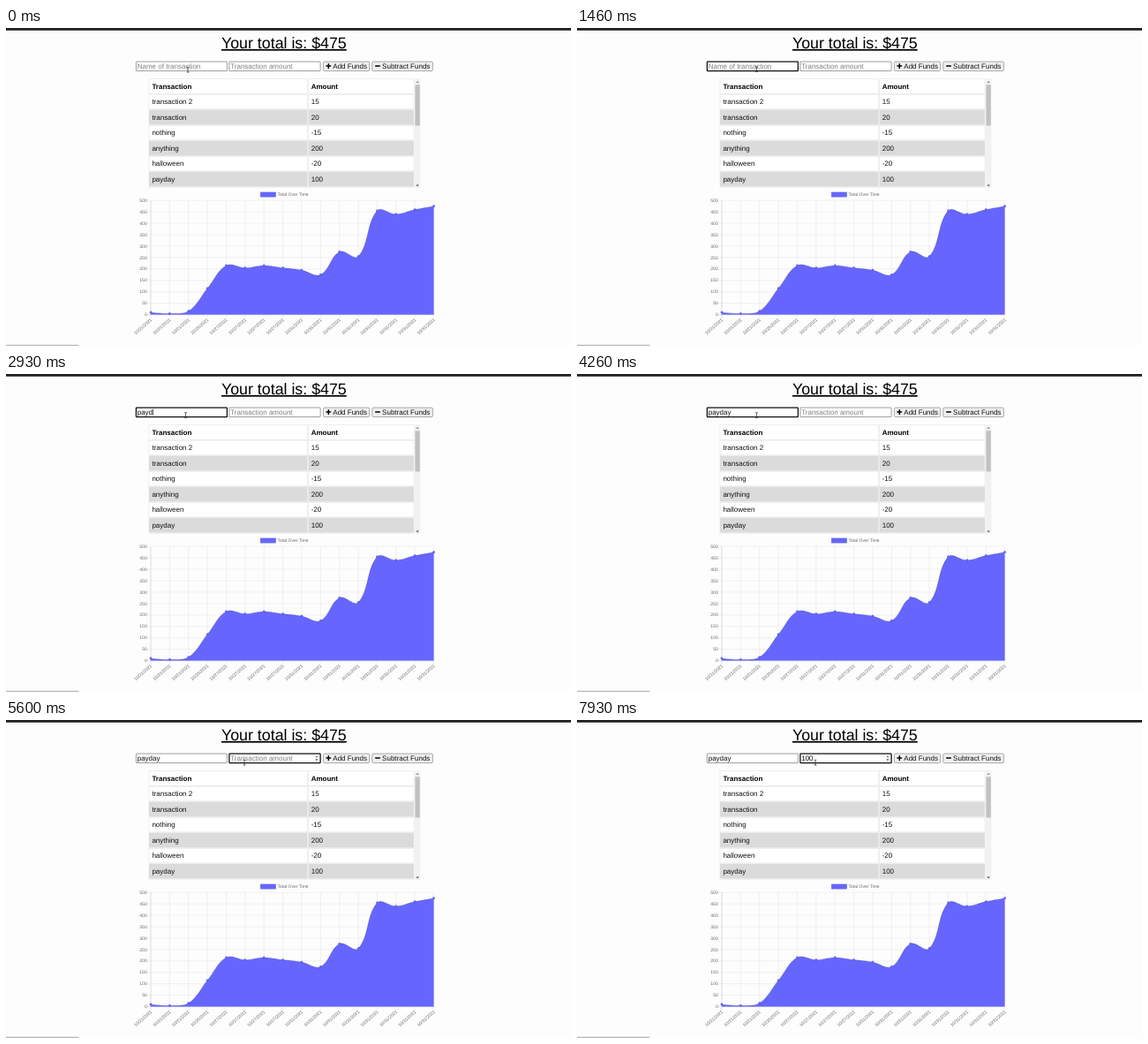
Animation of 640x360 px, one loop 8000 ms. Source, as an HTML page:

```html
<!DOCTYPE html>
<html lang="en">
<head>
<meta charset="utf-8">
<title>Budget tracker</title>
<style>
  html, body { margin: 0; width: 100%; height: 100%; overflow: hidden; background: #fdfdfd; }
  svg { display: block; width: 100%; height: 100%; }
  text {
    font: 8px "Liberation Sans", Arial, Helvetica, sans-serif;
    fill: #111; text-rendering: geometricPrecision; white-space: pre;
  }
  .title { font-size: 17.8px; fill: #000; text-decoration: underline; text-decoration-skip-ink: none; }
  .head { font-weight: bold; fill: #000; }
  .small { font-size: 5px; fill: #666; }
  .hint { fill: #808080; }
</style>
</head>
<body>
<svg id="stage" viewBox="0 0 640 360"></svg>
<script>
(() => {
const LOOP = 8000, BLINK = 500, VIOLET = '#6666ff';
const stage = document.getElementById('stage');

function el(tag, attrs, parent = stage) {
  const node = document.createElementNS('http://www.w3.org/2000/svg', tag);
  for (const k in attrs) node.setAttribute(k, attrs[k]);
  parent.appendChild(node);
  return node;
}
const rect = (x, y, width, height, fill, more) => el('rect', { x, y, width, height, fill, ...more });
const path = (d, fill, more) => el('path', { d, fill, ...more });
function label(x, y, str, cls = '', more) {
  const node = el('text', { x, y, class: cls, ...more });
  node.textContent = str;
  return node;
}

// Page edges and heading
rect(0, 0, 640, 2.8, '#202124');
rect(0, 358.2, 83, 1, '#dedede');
rect(0, 359.1, 82, 0.9, '#b4b4b4');
label(244, 22.9, 'Your total is: $475', 'title');

// Form
function makeField(x, width, hint, steps, spinner) {
  const box = rect(x, 38.1, width, 10.5, '#fff', { rx: 0.6 });
  const hintText = label(x + 1.3, 45.9, hint, 'hint');
  const text = label(x + 1.3, 45.9, '');
  const caret = rect(0, 39.7, 0.6, 7.3, '#000');
  const spin = spinner && path('M350.4 42.3l1.5-1.9 1.5 1.9zM350.4 44.3l1.5 1.9 1.5-1.9z', '#555');
  return { x, box, hintText, text, caret, spin, ...steps };
}
const fields = [
  makeField(147.4, 103, 'Name of transaction', {
    focus: 560, blur: 4750,
    keys: [[1930, 'p'], [2130, 'a'], [2400, 'y'], [2730, 'd'], [3530, 'a'], [3730, 'y']]
  }),
  makeField(252.9, 103.2, 'Transaction amount', {
    focus: 4750, blur: LOOP,
    keys: [[6300, '1'], [6660, '0'], [6950, '0']]
  }, true)
];

function button(x, width, textX, str) {
  rect(x, 38.1, width, 10.5, '#efefef', { rx: 1.3, stroke: '#767676', 'stroke-width': 0.6 });
  label(textX, 45.9, str);
}
button(359.4, 52.2, 370.3, 'Add Funds');
button(414.8, 68.6, 426.1, 'Subtract Funds');
const bar = { stroke: '#000', 'stroke-width': 1.5, 'stroke-linecap': 'round' };
path('M363 43.1h4.6M365.3 40.8v4.6', 'none', bar);
path('M418.7 43.1h4.6', 'none', bar);

// Table
const rows = [
  ['Transaction', 'Amount'], ['transaction 2', '15'], ['transaction', '20'], ['nothing', '-15'],
  ['anything', '200'], ['halloween', '-20'], ['payday', '100']
];
rows.forEach((row, i) => {
  const y = 57.7 + i * 17.52;
  const edge = { stroke: '#e4e4e4', 'stroke-width': 0.6 };
  const fill = i && i % 2 === 0 ? '#dbdbdb' : '#fff';
  rect(162, y, 179.3, 16.6, fill, edge);
  rect(342.6, y, 119.4, 16.6, fill, edge);
  label(165.4, y + 11.1, row[0], i ? '' : 'head');
  label(345.7, y + 11.1, row[1], i ? '' : 'head');
});
rect(161.6, 180.3, 300.6, 0.6, '#e8e8e8');
rect(462.6, 57.2, 6.8, 123.8, '#f1f1f1');
rect(463.4, 64.3, 5.4, 46.2, '#c1c1c1');
path('M464.4 62l1.7-2 1.7 2z', '#8c8c8c');
path('M464.4 177.4l1.7 2 1.7-2z', '#505050');

// Chart
const left = 164, right = 484.6, ceil = 195.2, base = 324.5;
const totals = [10, 5, 15, 115, 215, 205, 215, 205, 195, 175, 275, 255, 455, 440, 460, 475];
const days = [21, 21, 21, 25, 27, 27, 27, 27].concat(Array(8).fill(31));
const px = i => left + (right - left) * i / (totals.length - 1);
const py = v => base - (base - ceil) * v / 500;

rect(288.4, 186, 17, 5.1, VIOLET, { stroke: '#5c5ce6', 'stroke-width': 0.6 });
label(307.6, 190.3, 'Total Over Time', 'small');

const grid = { 'stroke-width': 0.5, stroke: '#e3e3e3' };
const axis = { ...grid, stroke: '#bdbdbd' };
for (let v = 0; v <= 500; v += 50) {
  path(`M160 ${py(v)}H${right}`, 'none', v ? grid : axis);
  label(159.7, py(v) + 1.7, v, 'small', { 'text-anchor': 'end' });
}
days.forEach((day, i) => {
  path(`M${px(i)} ${ceil}V328.6`, 'none', i ? grid : axis);
  label(0, 1.7, `10/${day}/2021`, 'small', {
    'text-anchor': 'end', transform: `translate(${px(i) + 0.6} 329.6) rotate(-41)`
  });
});

// Smooth line: handles follow the neighbours, shared by distance
const pts = totals.map((v, i) => [px(i), py(v)]);
const clampY = y => Math.max(ceil, Math.min(base, y));
const dist = (a, b) => Math.hypot(b[0] - a[0], b[1] - a[1]);
const handles = pts.map((p, i) => {
  const a = pts[i - 1] || p, b = pts[i + 1] || p;
  const da = dist(a, p), db = dist(p, b), k = 0.4 / (da + db);
  const shift = s => [p[0] + s * (b[0] - a[0]), clampY(p[1] + s * (b[1] - a[1]))];
  return { before: shift(-k * da), after: shift(k * db) };
});
let curve = 'M' + pts[0];
for (let i = 1; i < pts.length; i++) {
  curve += `C${handles[i - 1].after} ${handles[i].before} ${pts[i]}`;
}
path(`${curve}L${right} ${base}L${left} ${base}Z`, VIOLET);
path(curve, 'none', { stroke: '#000', 'stroke-opacity': 0.1, 'stroke-width': 1.26 });
pts.forEach(([cx, cy]) => el('circle', {
  cx, cy, r: 1.3, fill: VIOLET, stroke: '#000', 'stroke-opacity': 0.15, 'stroke-width': 0.45
}));

// Mouse pointer
const pointer = path('M-1.3 -3.1Q0 -3.1 0 -2.4Q0 -3.1 1.3 -3.1M0 -2.6V2.6M-1.3 3.1Q0 3.1 0 2.4Q0 3.1 1.3 3.1',
  'none', { stroke: '#222', 'stroke-width': 0.7 });
const moves = [[0, 206, 47.2], [60, 206, 47.2], [500, 203.5, 46.6], [4330, 203.5, 46.6], [4700, 270, 48.2], [LOOP, 270, 48.2]];

function pointerAt(t) {
  const i = moves.findIndex(m => m[0] > t);
  const a = moves[i - 1], b = moves[i];
  const u = (t - a[0]) / (b[0] - a[0]), e = u * u * (3 - 2 * u);
  return [a[1] + (b[1] - a[1]) * e, a[2] + (b[2] - a[2]) * e];
}

function drawField(f, t) {
  const on = t >= f.focus && t < f.blur;
  const typed = f.keys.filter(k => k[0] <= t);
  const str = typed.map(k => k[1]).join('');
  f.box.setAttribute('stroke', on ? '#101010' : '#767676');
  f.box.setAttribute('stroke-width', on ? 1.3 : 0.7);
  if (f.text.textContent !== str) f.text.textContent = str;
  f.hintText.style.display = str ? 'none' : '';
  const since = typed.length ? typed[typed.length - 1][0] : f.focus;
  const lit = on && Math.floor((t - since) / BLINK) % 2 === 0;
  f.caret.style.display = lit ? '' : 'none';
  f.caret.setAttribute('x', f.x + 1.3 + (str ? f.text.getComputedTextLength() : 0));
  if (f.spin) f.spin.style.display = on ? '' : 'none';
}

function draw(now) {
  const t = now % LOOP;
  fields.forEach(f => drawField(f, t));
  pointer.setAttribute('transform', `translate(${pointerAt(t)})`);
}

const start = performance.now();
function tick() {
  draw(Math.max(0, performance.now() - start));
  requestAnimationFrame(tick);
}
tick();
})();
</script>
</body>
</html>
```
